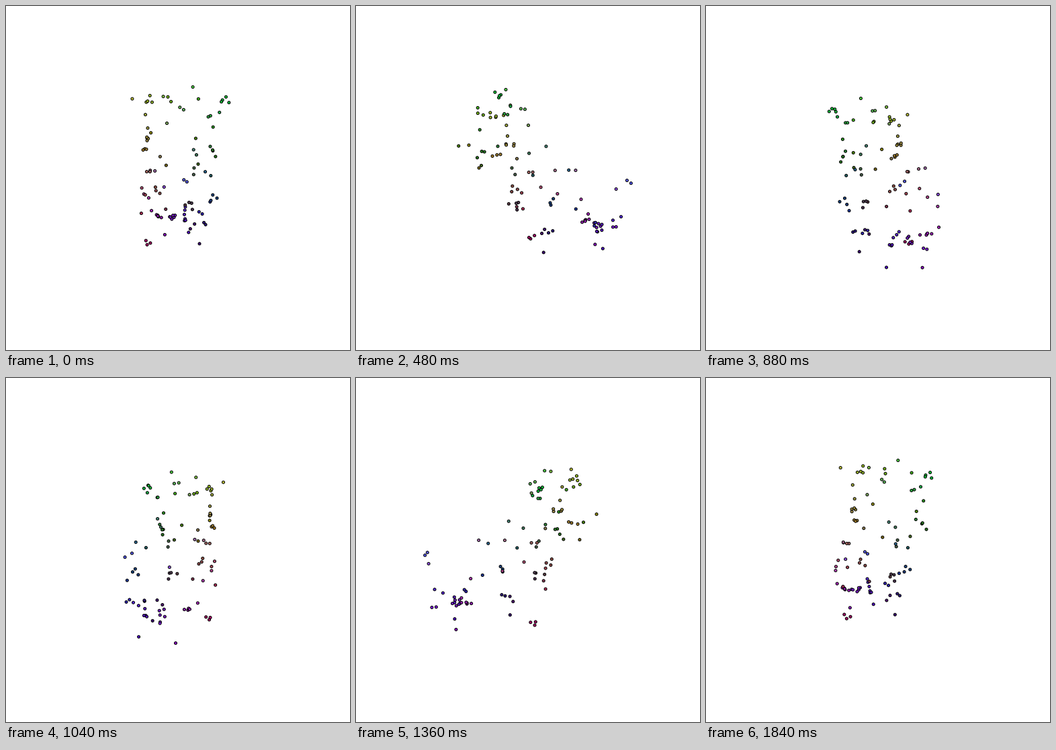
Animation of 512 by 512 pixels, one loop 1.92 s. Source, as a matplotlib script:

```python
import numpy as np
import matplotlib.pyplot as plt
from matplotlib.animation import FuncAnimation

SIZE, FRAMES, STEP = 512, 24, 80
CAMERA = 437  # distance from the eye to the axis of rotation

# Lone dots: x, depth, y (down) around the centre
loners = np.array([
    (-62, -42, -107), (-21, -28, -114), (20, -32, -126), (25, -71, -99),
    (58, -23, -93), (44, -65, -65), (-45, -36, -87), (-42, -34, -69),
    (-17, 0, -82), (-32, -95, -53), (-26, -18, -31), (-15, -76, -16),
    (20, -99, -46), (24, 25, -45), (27, 1, -35), (43, -41, -43),
    (25, -66, -18), (45, 54, -11), (49, 6, -4), (-46, 44, -13),
    (-41, 77, -13), (-28, 139, 17), (-57, 21, 15), (-57, 49, 26),
    (-48, -11, 24), (-53, 88, 35), (-49, 99, 59), (-54, -9, 51),
    (54, 62, 40), (33, 21, 102), (-18, -18, 44), (19, 106, 100),
    (-25, 105, 104),
])

# Clusters: number of dots, then the middle
clusters = [
    (4, -38, -57, -101), (2, -11, -73, -98), (2, 5, -8, -102),
    (4, 63, -38, -106), (2, 43, -30, -86), (4, -43, -30, -55),
    (3, -44, -52, -38), (3, 45, -63, -33), (2, 22, -21, -10),
    (2, -45, 4, -10), (2, 14, 145, 5), (3, -30, -23, 17),
    (5, -36, 92, 68), (2, -16, 133, 75), (4, -9, 105, 71),
    (2, 13, 128, 58), (4, 12, 103, 74), (2, 40, 90, 62),
    (3, 56, 30, 31), (2, 42, 30, 72), (2, 22, 21, 75),
    (4, 16, -19, 38), (3, -46, 5, 97),
]

rng = np.random.default_rng(7)


def scatter_around(count, *middle):
    offsets = rng.uniform(-1, 1, (count, 3)) * (6, 8, 6)
    return middle + offsets - offsets.mean(axis=0)


cloud = np.vstack([loners] + [scatter_around(*c) for c in clusters])
x, z, y = cloud.T

# Each axis drives one colour channel
colors = np.clip(np.column_stack([
    0.40 - 0.0053 * x,
    0.36 - 0.0036 * y,
    0.37 + 0.0037 * z,
]), 0, 1)

fig = plt.figure(figsize=(SIZE / 100, SIZE / 100), dpi=100, facecolor="white")
ax = fig.add_axes([0, 0, 1, 1])
ax.set_xlim(0, SIZE)
ax.set_ylim(SIZE, 0)
ax.axis("off")
dots = ax.scatter(x, y, s=8.5, c=colors, edgecolors="black", linewidths=0.7)


def draw(frame):
    angle = 2 * np.pi * frame / FRAMES
    cos, sin = np.cos(angle), np.sin(angle)
    depth = z * cos - x * sin
    scale = CAMERA / (CAMERA + depth)
    screen = SIZE / 2 + 0.5 + np.column_stack(
        [(x * cos + z * sin) * scale, y * scale])
    order = np.argsort(-depth)
    dots.set_offsets(screen[order])
    dots.set_facecolors(colors[order])
    return [dots]


anim = FuncAnimation(fig, draw, frames=FRAMES, interval=STEP,
                     repeat=True, repeat_delay=0, blit=False)
plt.show()
```
